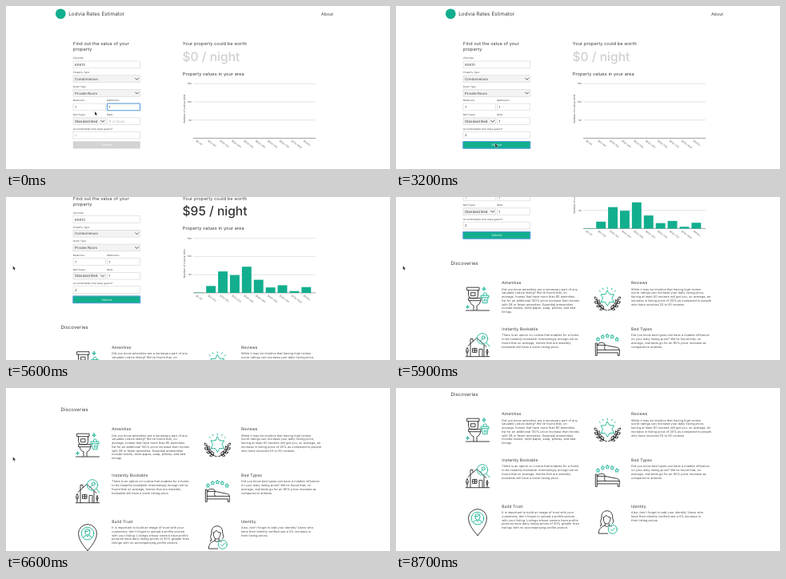
An HTML page for the animation above (9 s loop, 480 by 204 pixels).

```html
<!DOCTYPE html>
<html lang="en">
<head>
<meta charset="utf-8">
<title>Rates Estimator</title>
<style>
  html, body { margin: 0; width: 100%; height: 100%; overflow: hidden; background: #fff; }
  svg { display: block; width: 100vw; height: 100vh; }
  text { font-family: Inter, "Open Sans", sans-serif; letter-spacing: .02em; fill: #3a3a3a; text-rendering: geometricPrecision; }
  #price { letter-spacing: 0; font-weight: 500; }
  .field { fill: #fff; stroke: #d4d4d4; stroke-width: .6; }
  .select { fill: #f3f3f3; }
  .icon * { fill: none; stroke: #2b2b2b; stroke-width: .9; stroke-linejoin: round; stroke-linecap: round; }
  .icon .teal { stroke: #16b393; }
</style>
</head>
<body>
<svg id="stage" viewBox="0 0 480 204"></svg>
<script>
const LOOP = 9000, STEP = 100;
const TEAL = '#12ae8e', PALE = '#d0d0d0';
const BASE = 165.5, BAR_X = 235.3, PITCH = 14.9;

const label = (x, y, size, str, attrs = '') =>
  `<text x="${x}" y="${y}" font-size="${size}" ${attrs}>${str}</text>`;

const field = (x, y, w, name, value = '', select = false, attrs = '') =>
  label(x, y - 2.6, 2.9, name) +
  `<rect class="field ${select ? 'select' : ''}" x="${x}" y="${y}" width="${w}" height="8.8"/>` +
  label(x + 2, y + 6, 4.3, value, attrs) +
  (select ? `<path d="M${x + w - 6} ${y + 3.3}l2.2 2.2l2.2-2.2" fill="none" stroke="#333" stroke-width=".8"/>` : '');

const path = (d, teal) => `<path d="${d}" ${teal ? 'class="teal"' : ''}/>`;
const ring = (x, y, r, teal) => `<circle cx="${x}" cy="${y}" r="${r}" ${teal ? 'class="teal"' : ''}/>`;

function star(cx, cy, outer, inner, points) {
  let d = '';
  for (let i = 0; i < points * 2; i++) {
    const r = i % 2 ? inner : outer, a = i * Math.PI / points - Math.PI / 2;
    d += `${i ? 'L' : 'M'}${(cx + r * Math.cos(a)).toFixed(2)} ${(cy + r * Math.sin(a)).toFixed(2)}`;
  }
  return path(d + 'Z', true);
}

// Icons are drawn around their own centre.
const leaf = (x, y, angle) =>
  `<path transform="translate(${x} ${y}) rotate(${angle})" d="M0 0Q2.6-2.4 0-5Q-2.6-2.4 0 0"/>`;
function laurel(side) {
  let leaves = '';
  for (let i = 0; i < 4; i++) {
    const deg = 5 + i * 21, a = deg * Math.PI / 180;
    const x = side * 13 * Math.cos(a), y = 13 * Math.sin(a);
    leaves += leaf(x, y, side * (deg + 35)) + (i ? leaf(x, y, side * (deg - 40)) : '');
  }
  return leaves + path(`M${side * 13} 1A13 13 0 0 ${side > 0 ? 1 : 0} ${side} 14`);
}
const icons = {
  toilet:
    path('M-13-14.5H2V-11H-13zM-11.5-11V-5Q-11-1-8-1H-2Q.5-1 .5-5V-11M-8-8H-3V-4H-8z') +
    path('M-11-1H4V2H-11zM-10 2Q-9 7-5 8V14M4 2Q3 7-1 8.5V14M-14.5 14.3H14.5') +
    path('M4.5-4.5H14V-2H4.5zM5.5-2L6.5 5H12L13-2M7-4.5Q7-8 9.2-8T11.5-4.5M8.5 0V3M10.5 0V3', true) +
    star(8, -12.5, 2.3, .7, 4) + star(-12.5, 10, 2, .6, 4),
  award:
    star(0, -1, 9.6, 5.6, 6) + laurel(1) + laurel(-1) +
    path('M0-14.5V-13M-6-13.5L-5.2-12M6-13.5L5.2-12M-10-10.5L-9-9.3M10-10.5L9-9.3', true),
  house:
    path('M-12 1L-1-9L11 2M-9-2V14.3M8 0V14.3M-9-2V-8H-6V-5M-6 4H-1V9H-6zM-3.5 4V9M-6 6.5H-1M2 14V5H6V14') +
    path('M-13 14V7M-13 10Q-16 8-13 3Q-10 8-13 10M12 14V8M12 11Q9.5 9 12 5Q14.5 9 12 11M-14.7 14.3H14.7') +
    ring(6, -8, 6.7, true) + path('M10.8-3.2L15 1.6', true) +
    ring(7.3, -9.5, 2, true) + path('M6-8L2.5-4.5M3.5-5.5L4.7-4.3', true),
  bed:
    [-2, -1, 0, 1, 2].map(i => star(i * 5.9, -11.5 + i * i * 1.1, 2.5, 1.2, 5)).join('') +
    path('M-15-2V13H-13V9.5H13V13H15V6Q15 3.5 12 3L-3 0H-13V-2zM-13 6H15M-13 0V9.5') +
    path('M-12 0Q-12-3-9-3H-6Q-3-3-3 0M-3 0Q-5 3-3 6'),
  pin:
    path('M0 16.5Q-11.5 4-11.5-5A11.5 11.5 0 0 1 11.5-5Q11.5 4 0 16.5z') +
    ring(0, -5, 7.8, true) +
    path('M-3-7Q-3.5-10.5 0-10.5T3-7Q3-3 0-3T-3-7M-3-7.5Q1-7 2-9M-5.5 0Q-5-2-1.5-2.5L0-1L1.5-2.5Q5-2 5.5 0', true),
  person:
    path('M-5-6Q-5 2-1 2T4-6Q0-6-1.5-9Q-3-6-5-6M-7.5 3Q-10-1-7.5-5Q-8-14-.5-14.5Q7-14 6.5-5Q9-1 6.5 1.5') +
    path('M-7.5 3Q-9.5 3-9 5M-3 1.5V4Q-11 6-11 14H.5M2 1.5V4L5 5M-3 4Q-1 7 2 4') +
    ring(6.5, 8.7, 5.5, true) + path('M4 8.7L5.9 10.6L9.2 7', true)
};

const tips = [
  ['Amenities', 'toilet', `Did you know amenities are a necessary part of any
valuable Lodvia listing? We've found that, on
average, homes that have more than 85 amenities
list for an additional 100% price increase than homes
with 28 or fewer amenities. Essential ammenities
include towels, toilet paper, soap, pillows, and bed
linings.`],
  ['Reviews', 'award', `While it may be intuitive that having high review
score ratings can increase your daily listing price,
having at least 60 reviews will get you, on average, an
increase in listing price of 20% as compared to people
who have received 20 to 60 reviews.`],
  ['Instantly Bookable', 'house', `There is an option on Lodvia that enables for a home
to be instantly bookable. Interestingly enough we've
found that on average, homes that are instantly
bookable will have a lower listing price.`],
  ['Bed Types', 'bed', `Did you know bed types can have a notable influence
on your daily listing price? We've found that, on
average, real beds go for an 80% price increase as
compared to airbeds.`],
  ['Build Trust', 'pin', `It is important to build an image of trust with your
customers; don't forget to upload a profile picture
with your listing. Listings whose owners have profile
pictures have daily listing prices of 30% greater than
listings with no accompanying profile picture.`],
  ['Identity', 'person', `Also, don't forget to add your identity! Users who
have their identity verified see a 5% increase in
their listing prices.`]
];

function tip([title, icon, body], i) {
  const x = i % 2 ? 294.1 : 132.2, y = 235.2 + (i >> 1) * 57.7;
  return label(x, y, 5, title) +
    body.split('\n').map((line, n) =>
      label(x, y + 7.5 + n * 4.7, 3.72, line, 'style="fill:#4a4a4a"')).join('') +
    `<g class="icon" transform="translate(${i % 2 ? 264.3 : 102} ${y + 18.5})">${icons[icon]}</g>`;
}

const form =
  label(84, 49, 5.55, 'Find out the value of your') + label(84, 56, 5.55, 'property') +
  field(84, 69, 83.5, 'Zip Code', '60610') +
  field(84, 86.8, 83.5, 'Property Type', 'Condominium', true) +
  field(84, 104.5, 83.5, 'Room Type', 'Private Room', true) +
  field(84, 122, 40.5, 'Bedrooms', '1') +
  field(126.5, 122, 41, 'Bathrooms', '1') +
  field(84, 139.8, 40.5, 'Bed Types', 'Standard Bed', true) +
  field(126.5, 139.8, 41, 'Beds', '', false, 'id="beds"') +
  field(84, 157.2, 83.5, 'Accommodates how many guests?', '', false, 'id="guests"') +
  `<rect id="submit" x="83.8" y="169.3" width="84" height="9.2"/>` +
  label(125.8, 175.2, 3.7, 'Submit', 'text-anchor="middle" style="fill:#fff"') +
  `<rect id="focus" height="8.8" fill="none" stroke="#5a9fdc" stroke-width="1.1" rx=".6"/>
   <path id="caret" d="M86 159.2v5" stroke="#333" stroke-width=".5"/>`;

const units = [1, 19, 59, 49, 72, 36, 15, 21, 5, 16];
const ranges = ['$0-50', '$50-100', '$100-150', '$150-200', '$200-300', '$300-400',
  '$400-500', '$500-750', '$750-1000', '$1000+'];
const chart =
  label(220.8, 49, 5.55, 'Your property could be worth') +
  label(220.5, 68.7, 15.6, '', 'id="price"') +
  label(220.8, 86.6, 5.55, 'Property values in your area') +
  [150, 100, 50, 0].map((n, i) => {
    const y = 97.2 + i * 22.75;
    return `<path d="M234 ${y}H387" stroke="${n ? '#d9d9d9' : '#777'}" stroke-width=".7"/>` +
      (n ? label(232, y + 1, 2.9, n, 'text-anchor="end"') : '');
  }).join('') +
  label(0, 0, 3.1, 'Number of Lodvia Units', 'text-anchor="middle" transform="translate(224 128.5) rotate(-90)"') +
  ranges.map((r, i) => label(0, 0, 2.9, r,
    `transform="translate(${BAR_X + 2 + i * PITCH} 169.5) rotate(36)" style="fill:#555"`)).join('') +
  `<g id="bars" fill="${TEAL}">` + units.map((n, i) =>
    `<rect x="${BAR_X + i * PITCH}" y="${-n * .455}" width="11.9" height="${n * .455}"/>`).join('') + '</g>';

const stage = document.getElementById('stage');
stage.innerHTML = `<g id="page">
  <circle cx="68.3" cy="9.8" r="6.4" fill="${TEAL}"/>` +
  label(78.2, 12, 6.25, 'Lodvia Rates Estimator') + label(394, 11.9, 5.2, 'About') +
  form + chart + label(68.5, 210.7, 6, 'Discoveries') + tips.map(tip).join('') + `</g>
  <path id="arrow" d="M0 0V4.8L1.1 3.8L1.9 5.5L2.7 5.1L1.9 3.5H3.4Z" fill="#111" stroke="#fff" stroke-width=".3"/>
  <path id="beam" d="M-1-2.5Q0-2.5 0-2Q0-2.5 1-2.5M0-2V2M-1 2.5Q0 2.5 0 2Q0 2.5 1 2.5" fill="none" stroke="#222" stroke-width=".7"/>`;
const ui = Object.fromEntries([...stage.querySelectorAll('[id]')].map(el => [el.id, el]));

// Linear track through [time, value, value...] rows.
function track(rows, t) {
  const n = rows.findIndex(row => row[0] > t);
  if (n === 0) return rows[0].slice(1);
  if (n < 0) return rows[rows.length - 1].slice(1);
  const a = rows[n - 1], b = rows[n], k = (t - a[0]) / (b[0] - a[0]);
  return a.slice(1).map((v, i) => v + (b[i + 1] - v) * k);
}
const scrolling = [[5400, 0], [5500, 9], [5700, 82], [5900, 126], [6100, 149], [6400, 168],
  [6500, 174], [6600, 182], [6800, 197], [7000, 202], [7200, 202], [7600, 201]];
const pointer = [[0, 111, 132], [200, 116, 144], [300, 116, 144], [700, 134, 144.5], [1400, 134, 144.5],
  [1800, 123, 160.5], [2300, 123, 160.5], [2700, 124, 172], [3200, 124, 172], [3600, 22, 96],
  [3700, 5, 87], [3800, 8.7, 86.3]];

const show = (el, on) => el.setAttribute('visibility', on ? 'visible' : 'hidden');
const place = (el, x, y) => el.setAttribute('transform', `translate(${x} ${y})`);
function write(el, value, placeholder, filled) {
  el.textContent = filled ? value : placeholder;
  el.style.fill = filled ? '#333' : '#b5b5b5';
}

function render(t) {
  place(ui.page, 0, -track(scrolling, t)[0]);

  write(ui.beds, '1', '# of Beds', t >= 1200);
  write(ui.guests, '2', '2', t >= 2300);
  write(ui.price, '$95 / night', '$0 / night', t >= 3300);
  if (t < 3300) ui.price.style.fill = PALE;
  ui.submit.setAttribute('fill', t >= 2300 ? TEAL : '#d3d3d3');
  show(ui.caret, t >= 1800 && t < 2300);

  const [x, y, w] = t < 800 ? [126.5, 122, 41] : t < 1800 ? [126.5, 139.8, 41]
    : t < 3000 ? [84, 157.2, 83.5] : [83.8, 169.5, 84];
  ui.focus.setAttribute('x', x);
  ui.focus.setAttribute('y', y);
  ui.focus.setAttribute('width', w);

  const grow = 1 - (1 - Math.min(1, Math.max(0, (t - 3200) / 500))) ** 3;
  ui.bars.setAttribute('transform', `translate(0 ${BASE}) scale(1 ${grow})`);

  const [px, py] = track(pointer, t);
  const overText = t >= 600 && t < 2600;
  place(ui.arrow, px, py);
  place(ui.beam, px, py);
  show(ui.arrow, !overText && t < 8700);
  show(ui.beam, overText);
}

const start = performance.now();
function tick() {
  const t = (performance.now() - start) % LOOP;
  render(Math.floor(t / STEP) * STEP);
  requestAnimationFrame(tick);
}
tick();
</script>
</body>
</html>
```
